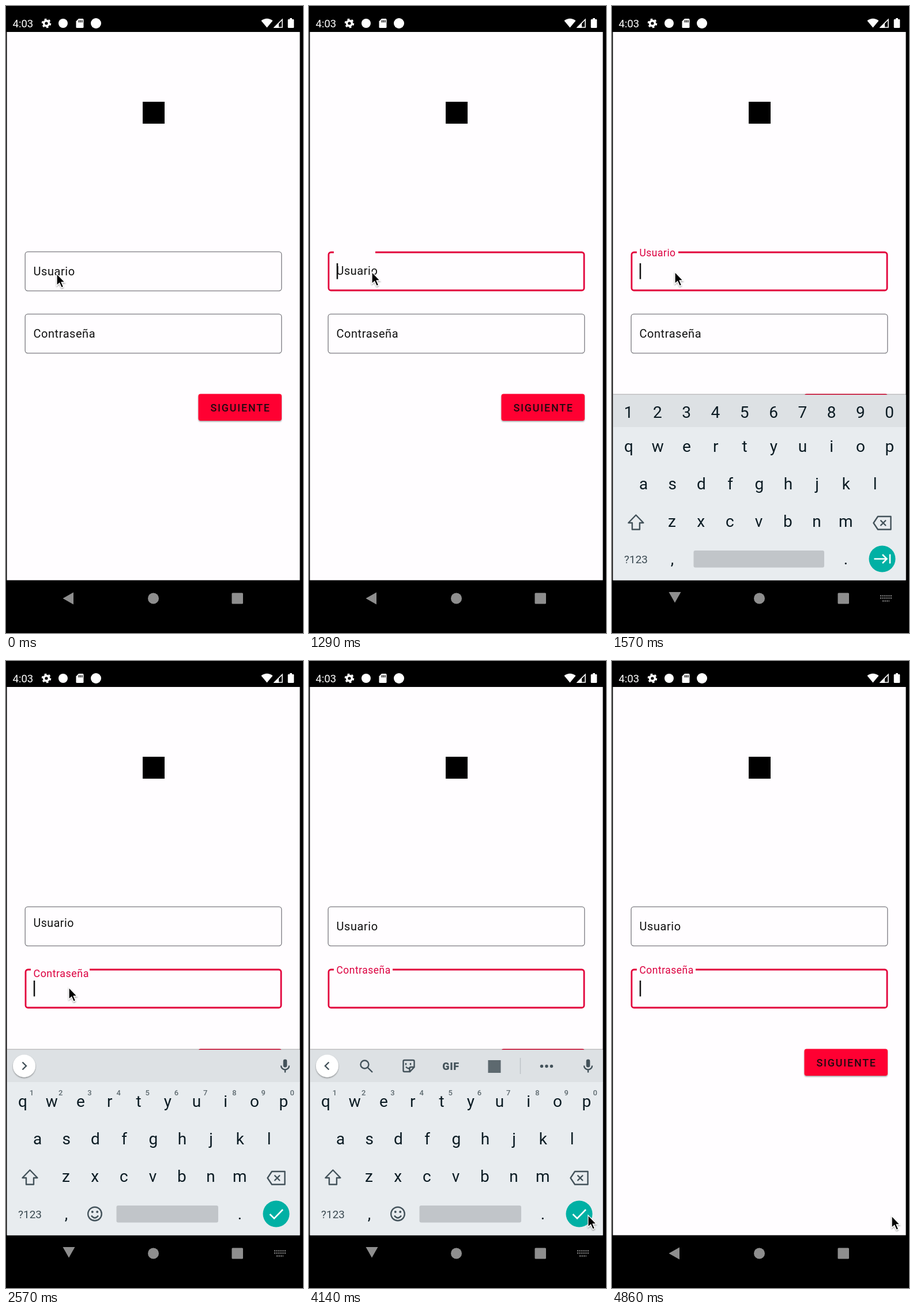
Write an HTML page that moves like this. It is 515 by 1087 pixels and loops after 5.01 s.

```html
<!DOCTYPE html>
<html lang="es">
<head>
<meta charset="utf-8">
<title>Inicio de sesión</title>
<style>
html, body { margin: 0; width: 100%; height: 100%; overflow: hidden; background: #000; }
svg { display: block; width: 100%; height: 100%; font-family: Roboto, sans-serif; }
.mid { text-anchor: middle; }
.line { fill: none; stroke: #43525a; stroke-width: 2.4; }
.label { letter-spacing: .0275em; }
.idle { fill: none; stroke: #7b7a80; stroke-width: 1.3; }
.active { fill: none; stroke: #e2003a; stroke-width: 2.8; }
</style>
</head>
<body>
<svg viewBox="0 0 515 1087">
  <defs>
    <filter id="soft" x="-30%" y="-30%" width="160%" height="180%">
      <feDropShadow dx="0" dy="1.5" stdDeviation="1.3" flood-opacity=".4"/>
    </filter>
  </defs>
  <rect width="515" height="1087"/>
  <rect x="1.5" y="45" width="508" height="950.5" fill="#fffdff"/>

  <g id="status" fill="#fff">
    <text x="11.5" y="36.7" font-size="18.5">4:03</text>
    <circle cx="70" cy="30" r="4.4" fill="none" stroke="#fff" stroke-width="3.6"/>
    <circle cx="70" cy="30" r="7" fill="none" stroke="#fff" stroke-width="2.6" stroke-dasharray="3.67 3.66"/>
    <circle cx="99" cy="30" r="8"/>
    <path d="M126 22h7q1.5 0 1.5 1.5v13q0 1.5-1.5 1.5h-10q-1.5 0-1.5-1.5v-10z"/>
    <path d="M126.5 24.5v4m2.7-4v4m2.7-4v4" stroke="#000" stroke-width="1.4"/>
    <circle cx="156" cy="30" r="9"/>
    <path d="M442.5 25.5q10-7.5 20 0L452.500 37.500z"/>
    <path d="M465.500 37h13.500v-13.500z" fill="none" stroke="#fff" stroke-width="1.600"/>
    <path d="M464 38 473 29v9z"/>
    <path d="M492 21h4v2h2q1.300 0 1.300 1.300v12.400q0 1.300-1.300 1.300h-8q-1.300 0-1.300-1.300v-12.400q0-1.300 1.300-1.300h2z"/>
  </g>

  <rect x="237" y="166" width="38" height="38"/>

  <g id="fields"></g>

  <rect x="333.500" y="672.500" width="144.500" height="46.500" rx="4" fill="#ff0033" filter="url(#soft)"/>
  <text x="354.500" y="703" font-size="18" font-weight="500" letter-spacing="1.7" fill="#210a10">SIGUIENTE</text>

  <g id="board">
    <rect x="2" y="672.500" width="507.500" height="1.500" opacity=".25"/>
    <rect x="2" y="674" width="507.500" height="56.500" fill="#dde1e4"/>
    <rect x="2" y="730" width="507.500" height="265.500" fill="#e8ecef"/>
    <g id="keys" class="mid" font-size="28" fill="#0b1b23"></g>
    <path class="line" d="M41.500 882.500 54.500 896h-6.500v11.500h-13v-11.500h-6.500z" stroke-linejoin="round"/>
    <path class="line" d="M461 885h22.500v22.500h-22.500l-7.500-11.250zm4.500 6.500 9.500 9.500m0-9.500-9.500 9.500" stroke-linejoin="round"/>
    <rect id="space" y="944" height="29.500" rx="3" fill="#c1c5c9"/>
    <circle cx="468.500" cy="958.500" r="23" fill="#00b0a4"/>
    <g id="userMode">
      <g id="digits" class="mid" font-size="28" fill="#0b1b23"></g>
      <path d="M454.500 958.500h22m-7.500-7.500 7.500 7.500-7.500 7.500m13-15.500v16" fill="none" stroke="#fff" stroke-width="2.500"/>
    </g>
    <g id="passMode">
      <g id="hints" class="mid" font-size="13" font-weight="500" fill="#5d696f"></g>
      <path d="M457.500 959 465 966.500 480 951" fill="none" stroke="#fff" stroke-width="2.600"/>
      <circle class="line" cx="154" cy="958.500" r="11.800"/>
      <path class="line" d="M148 961.500q6 8 12 0" />
      <g fill="#43525a">
        <circle cx="149.800" cy="955" r="2"/><circle cx="158.200" cy="955" r="2"/>
        <rect x="480.700" y="690.500" width="6.600" height="14" rx="3.300"/>
      </g>
      <path class="line" d="M477 701.500a7 7 0 0 0 14 0M484 708.500v5"/>
      <circle cx="31.500" cy="702" r="19.500" fill="#fff" filter="url(#soft)"/>
      <path id="chevron" class="line" d="M28.500 695.500 35 702 28.500 708.500"/>
      <g id="tools">
        <circle class="line" cx="96.500" cy="699.500" r="7"/>
        <path class="line" d="M101.500 704.500 110 713" stroke-width="3"/>
        <path class="line" d="M182.500 704V694q0-2-2-2h-15q-2 0-2 2v16q0 2 2 2h9.500zM182 704h-5.500q-2 0-2 2v6M168 703.500q4.500 5 7.500 1"/>
        <path class="line" d="M168 697v3.500m8-3.500v3.500"/>
        <text class="mid" x="246" y="708.500" font-size="18" font-weight="900" letter-spacing=".6" fill="#43525a">GIF</text>
        <rect x="310.500" y="692" width="22" height="22" fill="#5d696f"/>
        <path d="M366.500 688v28" stroke="#bcc2c6" stroke-width="1.400"/>
        <path d="M403.500 702.500h18" stroke="#43525a" stroke-width="5.500" stroke-linecap="round" stroke-dasharray="0 8.500"/>
      </g>
    </g>
  </g>

  <g fill="#8e8e8e">
    <path id="back" d="M-9.500 0 9-10.500v21z"/>
    <circle cx="255.500" cy="1027" r="9.500"/>
    <rect x="391.500" y="1017.500" width="19.500" height="19" rx="1.500"/>
    <path id="switch" d="M465 1022.500h20M465 1026.500h20M469 1031.500h12" fill="none" stroke="#8e8e8e" stroke-width="2.200" stroke-dasharray="2.200 1.360"/>
  </g>

  <path id="mouse" d="M0 0V20.500L4.700 16.300 8.200 24.300 11.600 22.800 8.200 15H14.300z" stroke="#fff" stroke-width="1.300" filter="url(#soft)"/>
</svg>
<script>
const LOOP = 5010, STEP = 1000 / 7;
const USER_FOCUS = 1270, PASS_FOCUS = 2468, HIDE = 4400, LABEL_MS = 167;
const $ = id => document.getElementById(id);
const clamp = v => Math.min(1, Math.max(0, v));
const span = (t, a, b) => clamp((t - a) / (b - a));
const mix = (a, b, p) => a + (b - a) * p;
const smooth = p => p * p * (3 - 2 * p);
const cubic = p => p < .5 ? 4 * p ** 3 : 1 - 4 * (1 - p) ** 3;
const show = (el, on) => el.setAttribute('visibility', on ? 'inherit' : 'hidden');

function add(parent, tag, attrs, text = '') {
  const el = document.createElementNS('http://www.w3.org/2000/svg', tag);
  for (const name in attrs) el.setAttribute(name, attrs[name]);
  el.textContent = text;
  return parent.appendChild(el);
}

function row(parent, chars, x, y, gap) {
  [...chars].forEach((c, i) => add(parent, 'text', { x: x + gap * i, y }, c));
}

function makeField(text, y, gapEnd) {
  const g = $('fields');
  const idle = add(g, 'rect', { class: 'idle', x: 33.2, y: y + .2, width: 444.6, height: 67.6, rx: 4.5 });
  const active = add(g, 'path', {
    class: 'active',
    d: `M${gapEnd} ${y + 1}H473a4 4 0 0 1 4 4v58a4 4 0 0 1-4 4H38a4 4 0 0 1-4-4v-58a4 4 0 0 1 4-4H43`
  });
  const label = add(g, 'text', { class: 'label', x: 47.5 }, text);
  const caret = add(g, 'rect', { x: 47.8, y: y + 20, width: 2.5, height: 27.5, fill: '#111' });
  return (focused, raised, blink) => {
    show(idle, !focused);
    show(active, focused);
    show(caret, focused && blink);
    label.setAttribute('y', mix(y + 41, y + 8.2, raised));
    label.setAttribute('font-size', mix(20, 17.5, raised));
    label.setAttribute('fill', focused && raised > .5 ? '#dc0040' : '#111');
  };
}

const userField = makeField('Usuario', 426, 115);
const passField = makeField('Contraseña', 534, 145);

row($('keys'), 'qwertyuiop', 29, 773, 50.25);
row($('keys'), 'asdfghjkl', 54.5, 838, 50.2);
row($('keys'), 'zxcvbnm', 104, 903, 50.2);
row($('keys'), ',.', 104.5, 968, 301);
add($('keys'), 'text', { x: 41.5, y: 965.5, 'font-size': 19, fill: '#3b4a52' }, '?123');
row($('digits'), '1234567890', 28.5, 714, 50.3);
row($('hints'), '1234567890', 44.5, 752.5, 50.2);

function mouseAt(t) {
  const a = smooth(span(t, 4.3 * STEP, 9 * STEP));
  const b = smooth(span(t, 12.5 * STEP, 16 * STEP));
  const c = cubic(span(t, 18.9 * STEP, 30 * STEP));
  return [88 + 21 * a + 376 * c, 464 - 3 * a + 105 * b + 396 * c];
}

function render(time) {
  // The screen refreshes seven times a second.
  const t = Math.min(34, Math.floor((time + 4.9) / STEP)) * STEP + .01;
  const inPass = t >= PASS_FOCUS, inUser = t >= USER_FOCUS && !inPass;
  const rise = start => smooth(span(t, start, start + LABEL_MS));
  const passRise = smooth(span(t, PASS_FOCUS - 20, PASS_FOCUS + 147));
  const blink = start => Math.floor((t - start) / 500) % 2 === 0;
  userField(inUser, rise(USER_FOCUS) - passRise, blink(USER_FOCUS));
  passField(inPass, passRise, blink(PASS_FOCUS));

  const opening = t >= 1400 && t < 1500;
  const closing = t >= HIDE && t < HIDE + 150;
  const open = t >= 1400 && t < HIDE + 150;
  show($('board'), open);
  $('board').setAttribute('transform', `translate(0 ${closing ? 23.5 : opening ? 12 : 0})`);
  $('board').setAttribute('opacity', closing ? .65 : opening ? .85 : 1);
  show($('userMode'), !inPass);
  show($('passMode'), inPass);
  $('space').setAttribute('x', inPass ? 191.5 : 141.5);
  $('space').setAttribute('width', inPass ? 176.5 : 226.5);

  $('tools').setAttribute('opacity', span(t, 2571, 3000));
  $('chevron').setAttribute('transform', t > 2800 ? 'rotate(180 31.5 702)' : '');

  const back = closing ? [110, 1024, 90] : opening ? [108.5, 1026, -60]
    : open ? [109, 1025, -90] : [108, 1027, 0];
  $('back').setAttribute('transform', `translate(${back[0]} ${back[1]}) rotate(${back[2]})`);
  show($('switch'), open && !opening && !closing);
  $('mouse').setAttribute('transform', `translate(${mouseAt(t)})`);
}

const begin = performance.now();
function tick() {
  render((performance.now() - begin) % LOOP);
  requestAnimationFrame(tick);
}
tick();
</script>
</body>
</html>
```
